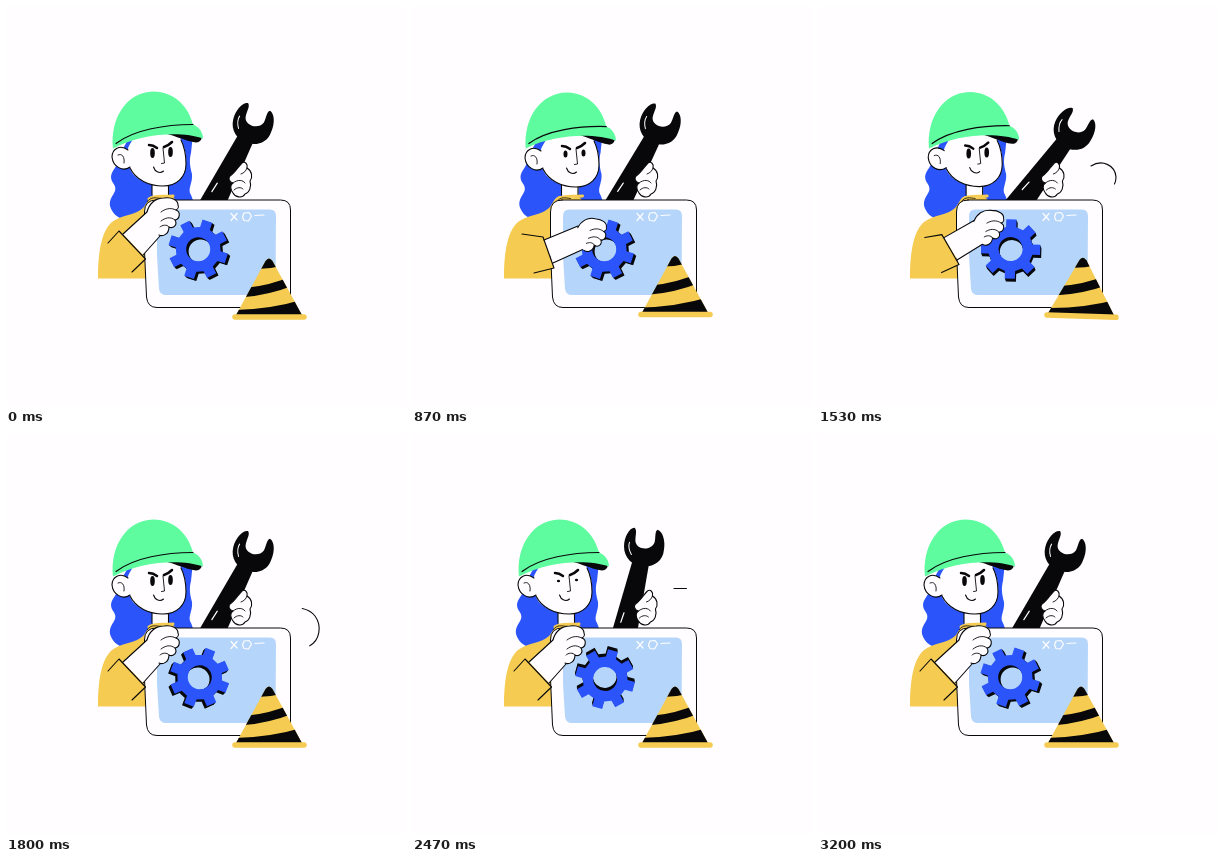
Recreate the animation shown at these times as an HTML page with a canvas. Size 400x400 px, loop 3.27 s.

```html
<!DOCTYPE html>
<html lang="en">
<head>
<meta charset="utf-8">
<style>
html, body { margin: 0; width: 100%; height: 100%; overflow: hidden; background: #fffdff; }
canvas { display: block; width: 100vw; height: 100vh; }
</style>
</head>
<body>
<canvas id="stage"></canvas>
<script>
const LOOP = 3270, STEPS = 49;
const INK = '#08080a', WHITE = '#fffdff', GREEN = '#5efc9f', YELLOW = '#f5cb52',
      BLUE = '#2b55fb', SKY = '#b5d6fa';
const canvas = document.getElementById('stage');
const ctx = canvas.getContext('2d');

const ease = u => u * u * (3 - 2 * u);
const mix = (a, b, u) => a + (b - a) * u;
const clamp = u => Math.max(0, Math.min(1, u));

// Eased value through [time, value] keys
function track(t, keys) {
  if (t <= keys[0][0]) return keys[0][1];
  for (let i = 1; i < keys.length; i++) {
    const [t0, v0] = keys[i - 1], [t1, v1] = keys[i];
    if (t <= t1) return mix(v0, v1, ease((t - t0) / (t1 - t0)));
  }
  return keys[keys.length - 1][1];
}

function shape(d, fill, stroke, width = 1.1) {
  const path = new Path2D(d);
  if (fill) { ctx.fillStyle = fill; ctx.fill(path, 'evenodd'); }
  if (stroke) { ctx.strokeStyle = stroke; ctx.lineWidth = width; ctx.stroke(path); }
}
const line = (d, color = INK, width = 1.1) => shape(d, null, color, width);
const poly = points => 'M' + points.map(p => p.join(' ')).join('L');

function ellipse(x, y, rx, ry, fill) {
  ctx.beginPath();
  ctx.ellipse(x, y, rx, ry, 0, 0, 7);
  ctx.fillStyle = fill;
  ctx.fill();
}

function group(x, y, degrees, draw) {
  ctx.save();
  ctx.translate(x, y);
  ctx.rotate(degrees * Math.PI / 180);
  draw();
  ctx.restore();
}

function hair(lean) {
  group(3.5 * lean, 0, 0, () => {
    shape('M113 150C113 160 105 164 105 171C105 177 111 179 109 185C107 190 103 193 104 200' +
      'C106 207 111 212 120 214L184 210C189 205 188 195 185 189C181 183 187 177 186 168' +
      'C184 160 183 155 185 147L187 128L125 128Z', BLUE);
  });
}

function torso(lean) {
  shape('M92 272.5C92 244 96 225 106 216C115 209 130 209 137 202C141 198 141 193 147 190' +
    'L166 190L176 200L145 272.5Z', YELLOW);
  group(3.5 * lean, 0, 0, () => {
    shape('M146 172L146 189C150 193 160 193 163 189L163 172Z', WHITE);
    line('M146 177L146 189M162.5 179L162.5 190');
    line('M143 193C148 189 157 191 167 190', YELLOW, 3);
    line('M141 196C145 190 150 192 155 192.5', INK, .8);
  });
}

function head(lean, eye) {
  group(7 * lean, lean, 0, () => {
    shape('M124 138C119 145 121 160 127 168C134 176 146 180 157 180C171 180 180 171 180 158' +
      'C181 148 178 138 172 128L130 128Z', WHITE);
    line('M124 162C130 174 143 180 157 180C171 180 180 171 180 158C180 148 178 140 175 134');
    shape('M122 144C114 138 106 143 106 151C107 161 117 166 124 161', WHITE, INK);
    line('M112 149C116 147 119 151 118 157', INK, .9);
    line('M143 139C146 139 148.5 140 151 142', INK, 2.5);
    line('M158 141C161 140 164 138 166 136', INK, 2.5);
    ellipse(146.5, 147, 2.3 * mix(.6, 1, eye), 5 * eye, INK);
    ellipse(164.5, 146, 2.3 * mix(.6, 1, eye), 5 * eye, INK);
    line('M157 142L158.5 157L155.5 157.5', INK, .9);
    line('M147.5 161C149 166 154 168 157.5 165');
    // Hard hat
    group(147, 129.5, lean * 1.5, () => {
      ctx.translate(-147, -130);
      shape('M150 126C165 128 180 136 190 137C194 137 196 134 196 130Z', INK);
      shape('M107 143C104 113 120 87 147 86C170 86 183 103 187 119C193 121 197 127 197 133' +
        'C176 126 138 127 107 143Z', GREEN);
      line('M110 138C128 124 160 119 187 119', INK, 1.2);
    });
  });
}

function wrench(angle) {
  group(218, 175, angle, () => {
    shape('M-13 34L-8.5 -46L8.5 -46L13 34Z', INK);
    group(0, -62, -8, () => {
      shape('M-11 -20C-16 -20 -21 -10 -20 0C-19 11 -10 18 0 18C11 18 20 11 20 0' +
        'C21 -10 17 -19 12 -20C9 -18 11 -12 10 -7C7 2 -7 2 -9 -6C-10 -12 -8 -17 -11 -20Z', INK);
      line('M-15 -5C-16 -1 -14 4 -12 7', WHITE, 1);
    });
    line('M-6 15L-5 5', WHITE, 1.2);
  });
}

function gripHand(angle) {
  group((angle - 27) * .04, 0, 0, () => {
    shape('M224 170C229 167 232 161 236 157C239 155 242 158 241 162C246 165 247 171 244 175' +
      'C246 181 243 187 239 188C236 193 229 191 227 187C224 183 224 179 227 177' +
      'C223 176 222 172 224 170Z', WHITE, INK);
    line('M241 162C240 165 238 167 235 168M227 177C232 173 237 174 239 177' +
      'M228 184C231 181 235 181 237 183', INK, .9);
  });
}

function panel() {
  shape('M150 194L274.5 194Q284.5 194 284.5 204L284.5 291Q284.5 301.5 274 301.5L151 301.5' +
    'Q141.5 301.5 140.5 291L138.5 245L138.5 206Q138.5 194 150 194Z', WHITE, INK, 1);
  shape('M157 203.5L264 203.5Q270 203.5 270 210L269.5 283Q269.5 289 263 289L160 289' +
    'Q154 289 153 283L151 250L151 210Q151 203.5 157 203.5Z', SKY);
  line('M225 207.5L231 214M231 207.5L225 214.5M238 207L243 206.5L245.5 210L242.5 215' +
    'L238 214.5L236.5 211ZM249 209.5L258 209', WHITE, 1.2);
}

function gearPath() {
  const teeth = 8, pitch = 2 * Math.PI / teeth, pts = [];
  const put = (r, a) => pts.push([r * Math.cos(a), r * Math.sin(a)]);
  for (let i = 0; i < teeth; i++) {
    const a = (-72 * Math.PI / 180) + i * pitch;
    put(22.5, a - .23);
    put(30, a - .17);
    put(30, a + .17);
    put(22.5, a + .23);
  }
  return poly(pts) + 'ZM12 0A12 12 0 1 0 -12 0A12 12 0 1 0 12 0Z';
}
const GEAR = gearPath();

function gear(turn) {
  group(193, 244, turn, () => {
    for (let i = 3; i >= 0; i--) {
      ctx.save();
      ctx.translate(-.8 + i * .8, -.7 + i * .7);
      shape(GEAR, i ? INK : BLUE);
      ctx.restore();
    }
  });
}

function arm(lean) {
  const blend = (a, b) => a.map((p, i) => [mix(p[0], b[i][0], lean), mix(p[1], b[i][1], lean)]);
  const sleeve = blend([[102, 237], [113, 225], [139.5, 253], [126, 266]],
                       [[110, 228], [131, 231], [142, 262], [122, 267]]);
  const fore = blend([[117, 228], [141, 206], [154, 230], [137, 249]],
                     [[132, 234], [166, 220], [174, 242], [141, 257]]);
  shape(poly(sleeve) + 'Z', YELLOW);
  shape(poly(fore) + 'Z', WHITE);
  line(poly(fore.slice(0, 2)) + poly(fore.slice(2)));
  line(poly(sleeve));
  group(mix(156, 178, lean), mix(211, 229, lean), lean * 12, () => {
    const size = mix(1, .9, lean);
    ctx.scale(size, size);
    const fist = 'M-15 -5C-13 -13 -7 -19 2 -19C10 -20 16 -17 16 -12C17 -10 16 -8 14 -7' +
      'C19 -5 18 2 13 3C16 8 11 12 7 10C7 17 1 20 -3 18';
    shape(fist + 'L-10 14Z', WHITE);
    line(fist);
    line('M14 -7C8 -10 3 -8 -1 -5M13 3C8 -1 3 1 -1 4M7 10C5 7 0 8 -2 10', INK, .9);
  });
}

function cone(lift, tilt) {
  group(263.5, 311 + lift, tilt, () => {
    ctx.save();
    const body = 'M-34 -1L-4 -56Q-.5 -61 3 -56L33 -1Z';
    shape(body, YELLOW);
    ctx.clip(new Path2D(body));
    shape('M-12 -48Q0 -48 12 -51L12 -65L-12 -65Z', INK);
    shape('M-25 -29Q0 -31 25 -42L25 -32Q0 -22 -25 -20Z', INK);
    shape('M-40 -7Q0 -7 35 -18L35 0L-40 0Z', INK);
    ctx.restore();
    line('M-34.5 0L34.5 0', YELLOW, 5.5);
  });
}

function squiggle(t) {
  for (const start of [200, 1400, 2600]) {
    const age = t - start;
    const from = 112 * clamp((age - 250) / 270), to = 112 * clamp(age / 190);
    if (to - from < .5) continue;
    ctx.setLineDash([to - from, 500]);
    ctx.lineDashOffset = -from;
    line('M273 160C284 153 297 159 298 171C298 182 289 185 288 178' +
      'C287 171 303 174 309 182C317 193 313 209 301 213');
    ctx.setLineDash([]);
  }
}

const during = (t, ...spans) => spans.some(([a, b]) => t >= a && t < b);

function accents(t) {
  if (during(t, [1000, 1400], [1950, 2300]))
    line('M90.5 194L102 199.5M95 184L104 193M105 179.5L110 188', INK, .8);
  if (during(t, [1150, 1400], [2350, 2600])) line('M262 154.5L274.5 154.5', INK, 1);
}

function draw(t) {
  const scale = Math.min(innerWidth, innerHeight) / 400, dpr = devicePixelRatio || 1;
  const w = Math.round(innerWidth * dpr), h = Math.round(innerHeight * dpr);
  if (canvas.width !== w || canvas.height !== h) { canvas.width = w; canvas.height = h; }
  ctx.setTransform(1, 0, 0, 1, 0, 0);
  ctx.fillStyle = WHITE;
  ctx.fillRect(0, 0, w, h);
  ctx.setTransform(scale * dpr, 0, 0, scale * dpr, 0, 0);
  ctx.lineCap = ctx.lineJoin = 'round';

  const lean = track(t, [[410, 0], [780, 1], [1300, 1], [1690, 0]]);
  const angle = track(t, [[700, 27], [900, 28], [1270, 39], [1330, 39], [1800, 27],
    [2430, 13], [2500, 13], [3150, 27]]);
  const eye = track(t, [[720, 1], [850, .7], [900, .7], [1050, 1],
    [2330, 1], [2450, .25], [2520, .25], [2650, 1]]);
  const lift = track(t, [[0, 0], [400, -100], [450, -100], [910, 0], [1270, -1.5], [1700, 0]]);
  const tilt = track(t, [[950, 0], [1270, -4], [1530, 3], [1760, 0]]);
  const turn = 360 * clamp((t - 1320) / 1860);

  hair(lean);
  torso(lean);
  head(lean, eye);
  wrench(angle);
  gripHand(angle);
  panel();
  gear(turn);
  arm(lean);
  squiggle(t);
  cone(lift, tilt);
  accents(t);
}

function frame() {
  const t = performance.now() % LOOP;
  draw(Math.floor(t / LOOP * STEPS + .05) * LOOP / STEPS);
  requestAnimationFrame(frame);
}
frame();
</script>
</body>
</html>
```
